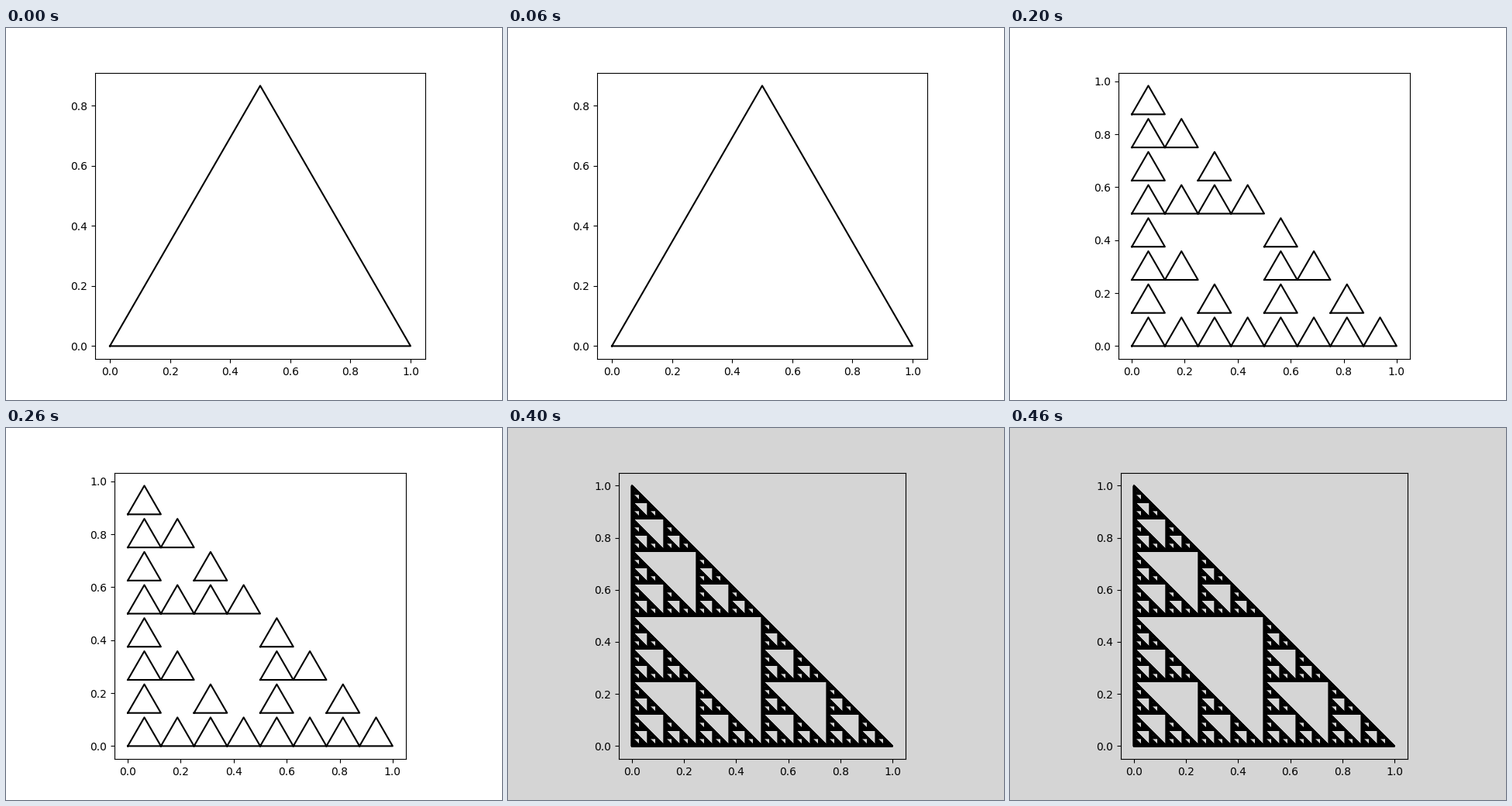
Animation, 640 px wide and 480 px high, one loop 500 ms. Source, as a matplotlib script:

```python
import numpy as np
import matplotlib.pyplot as plt
from matplotlib.animation import FuncAnimation
from matplotlib.collections import LineCollection
from matplotlib.patches import Rectangle

STEPS = 5
SHIFTS = np.array([[0, 0], [0.5, 0], [0, 0.5]])
TRIANGLE = np.array([[0, 0], [0.5, np.sqrt(3) / 2], [1, 0], [0, 0]])


def fractal(depth):
    """Apply the three half-size maps to the triangle `depth` times."""
    shapes = TRIANGLE[None]
    for _ in range(depth):
        shapes = np.concatenate([shapes / 2 + shift for shift in SHIFTS])
    return shapes


fig, ax = plt.subplots(figsize=(6.4, 4.8), dpi=100)
backdrop = fig.add_artist(
    Rectangle((0, 0), 1, 1, transform=fig.transFigure, lw=0, zorder=-1))


def draw(step):
    # Step k adds k more iterations, so depths are 0, 1, 3, 6, 10.
    shapes = fractal(step * (step + 1) // 2)
    top = shapes[..., 1].max()

    ax.clear()
    ax.set_facecolor("none")
    backdrop.set_facecolor("#d5d5d5" if step == STEPS - 1 else "white")
    ax.add_collection(LineCollection(
        shapes, colors="black", linewidths=1.5,
        capstyle="projecting", joinstyle="round"))
    ax.set_aspect("equal")
    ax.set_xlim(-0.05, 1.05)
    ax.set_ylim(-0.05 * top, 1.05 * top)
    return []


anim = FuncAnimation(fig, draw, frames=STEPS, interval=100, repeat=True,
                     repeat_delay=0)
plt.show()
```
